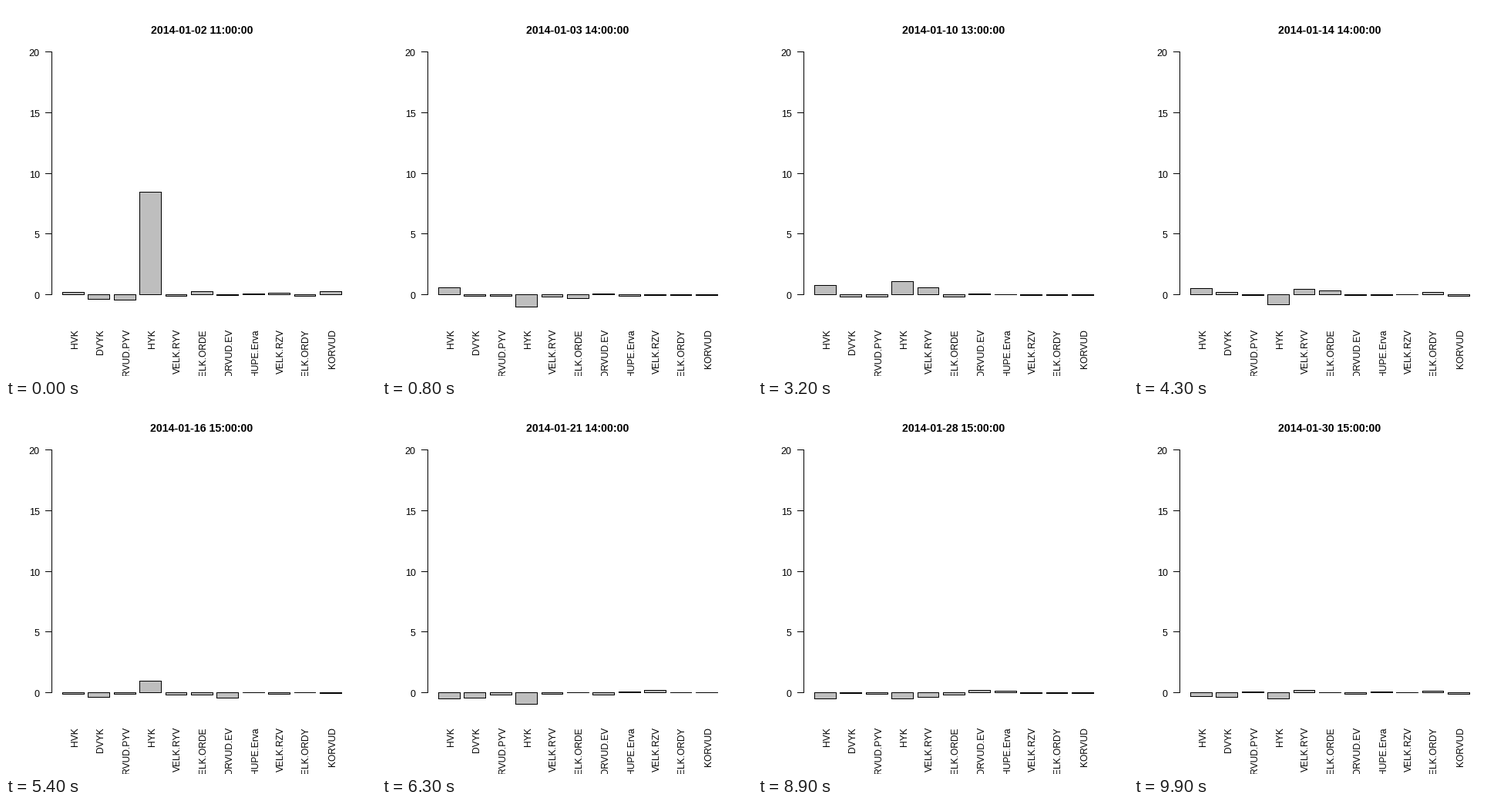
A matplotlib script that plays this animation: 480x480 px, repeating every 10 s.

```python
import numpy as np
import matplotlib.pyplot as plt
from matplotlib.animation import FuncAnimation
from matplotlib.patches import Rectangle

SIZE, DPI = 480, 100
PX = 72 / DPI                            # points per pixel

# Plot region in pixels; values run from -2 to 20, bars are 1 wide with 0.2 gaps
X0, X1, Y0, Y1 = 59.04, 449.76, 406.56, 59.04
Y_UNIT = (Y0 - Y1) / 22
X_UNIT = (X1 - X0) / (13 * 1.08)

VENUES = ["HVK", "DVYK", "KORVUD.PYV", "HYK", "VELK.RYV", "VELK.ORDE",
          "KORVUD.EV", "HUPE.Erva", "VELK.RZV", "VELK.ORDY", "KORVUD"]
THIN = VENUES.index("HYK")               # the thinly traded, erratic venue
HOLIDAY = 20
DAYS = [d for d in range(2, 31) if d % 7 not in (4, 5) and d != HOLIDAY]
STAMPS = [f"2014-01-{d:02d} {h}:00:00" for d in DAYS for h in range(11, 16)]


def row(value):
    return int(Y0 - (value + 2) * Y_UNIT)


def make_values():
    """Hourly deviation from the mean: skewed, never below -1."""
    rng = np.random.default_rng(14)
    spread = np.geomspace(.42, .1, len(VENUES))
    spread[THIN] = 1.3
    noise = rng.standard_normal((len(STAMPS), len(VENUES)))
    values = np.clip(np.exp(spread * noise - spread ** 2 / 2) - 1, -1, 8)
    values[0, THIN] = 8.45               # opening spike
    return values


VALUES = make_values()

plt.rcParams["font.family"] = "Liberation Sans"
fig = plt.figure(figsize=(SIZE / DPI, SIZE / DPI), dpi=DPI, facecolor="white")
ax = fig.add_axes([0, 0, 1, 1])
ax.set(xlim=(0, SIZE), ylim=(SIZE, 0))
ax.axis("off")


def rect(x, y, w, h, color="black"):
    return ax.add_patch(Rectangle((x, y), w, h, fc=color, lw=0))


axis_x = int(X0)
rect(axis_x, row(20), 1, row(0) - row(20) + 1)
for v in range(0, 21, 5):
    tick = int(X0 - 7.2)
    rect(tick, row(v), axis_x - tick, 1)
    ax.text(43.7, row(v) + 6, str(v), size=12.5 * PX, ha="right", va="baseline")

outer, inner = [], []
for i, name in enumerate(VENUES):
    left = X0 + (.52 + 1.2 * i) * X_UNIT
    x, width = int(left), int(left + X_UNIT) - int(left) + 1
    outer.append(rect(x, row(0), width, 1))
    inner.append(rect(x + 1, row(0), width - 2, 0, "#bebebe"))
    ax.text(left + 19.3, 419, name, size=12 * PX, rotation=90,
            rotation_mode="anchor", ha="right", va="baseline")

title = ax.text(254, 36, "", size=14.15 * PX, weight="bold", ha="center", va="baseline")


def draw(k):
    title.set_text(STAMPS[k])
    for box, fill, value in zip(outer, inner, VALUES[k]):
        top, bottom = sorted((row(0), row(value)))
        box.set_y(top)
        box.set_height(bottom - top + 1)
        fill.set_y(top + 1)
        fill.set_height(max(bottom - top - 1, 0))
        fill.set_visible(bottom - top > 1)
    return [title, *outer, *inner]


anim = FuncAnimation(fig, draw, frames=len(STAMPS), interval=100,
                     repeat=True, repeat_delay=0, blit=False)
plt.show()
```
